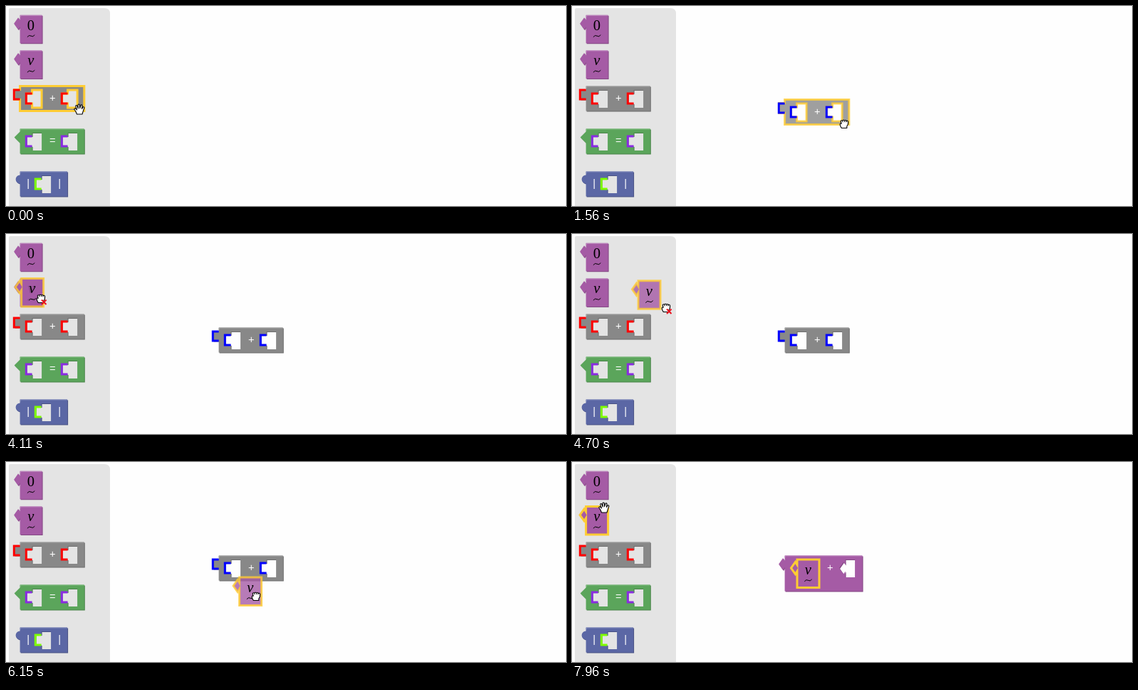
An HTML page for the animation above (8000 ms loop, 786 by 281 pixels).

```html
<!DOCTYPE html>
<html lang="en">
<head>
<meta charset="utf-8">
<title>Vector blocks</title>
<style>
  html, body { margin: 0; width: 100%; height: 100%; overflow: hidden; background: #fefefe; }
  svg { display: block; width: 786px; height: 281px; }
  .face, .dark { fill-rule: evenodd; }
  .light { fill: none; stroke-width: 1; }
  .bracket { fill: none; stroke-width: 3; }
  .sign { font: 14.67px "Liberation Sans", Arial, sans-serif; fill: #fff; text-anchor: middle; }
  .math { font: 20.5px "Liberation Serif", "Times New Roman", serif; text-anchor: middle; }
  .italic { font-style: italic; }
  .tilde { fill: none; stroke: #000; stroke-width: 1; }
  .sel > .face { stroke: #fc3; stroke-width: 3; }
  .sel > .light, .drag > .light, .drag > .dark { display: none; }
  .drag > .face { fill-opacity: .8; stroke-opacity: .8; }
  #cursor path { fill: #fff; stroke: #000; stroke-width: 1.1; stroke-linejoin: round; }
  #cursor .crease { fill: none; }
  #cursor #cross { fill: none; stroke: #e8101c; stroke-width: 2; }
</style>
</head>
<body>
<svg viewBox="0 0 786 281" xmlns="http://www.w3.org/2000/svg">
  <path d="M4 281V5q0-2 2-2H138q8 0 8 8V281Z" fill="#e4e4e4"/>
  <g id="blocks"></g>
  <g id="cursor">
    <g id="open" transform="translate(-8 -8)">
      <path d="M4.5 15L2.7 10.8.8 8.2Q1 6.3 2.9 7.2L4.5 9 2.7 3.6Q3.2 1.8 4.7 3L6.3 7 6 1.8Q7 .2 8.3 1.6L8.7 6.6 10 2.2Q11.3 1.2 12 2.8L11.5 7.4 13.2 4.8Q14.9 4.3 14.8 6L13.3 10.6 12 15Z"/>
    </g>
    <g id="closed" transform="translate(-8 -8)">
      <path d="M4.3 14.5L2.6 11.4 2.2 9Q2.7 7.5 4.2 8.3L3.2 4.8Q4 3 5.7 4.2 7 2.6 8.5 3.9 10 2.9 11.2 4.4 13.3 3.8 13.6 5.8L13.4 9.2 11.8 12V14.5Z"/>
      <path class="crease" d="M6 4.4V6.2M8.6 4.2V6M11 4.6V6.3"/>
    </g>
    <g id="arrow">
      <path d="M.5 .5V16.3L4.1 13 6.7 18.6 9 17.6 6.5 12H11.2Z"/>
    </g>
    <path id="cross" d="M1 2.5l6.5 6.5m0-6.5l-6.5 6.5"/>
  </g>
</svg>
<script>
const $ = id => document.getElementById(id);

// Connector outlines, drawn upwards along a left edge around height c
const tabs = {
  arrow: c => `V${c + 4.5}l-2.5 4l-6-8.5l6-8.5l2.5 4`,
  wedge: c => `V${c + 8}l-8-8l8-8`,
  round: c => `V${c + 6}a6 6 0 0 1 0-12`,
  square: c => `V${c + 7}h-8v-14h8`
};

// Face, lit edge, shaded edge
const palette = {
  purple: ['#a55ba5', '#c08cc0', '#844984'],
  grey: ['#888888', '#acacac', '#6d6d6d'],
  green: ['#5ba55b', '#8cc08c', '#498449'],
  blue: ['#5b67a5', '#8c95c0', '#495284']
};

const bracket = (x, c, r, color) =>
  `<path class="bracket" stroke="${color}" d="M${x} ${c - r}h-8.3v${2 * r}h8.3"/>`;

const sign = (x, text) => `<text class="sign" x="${x + 0.6}" y="21.6">${text}</text>`;

const math = (text, style = '') =>
  `<text class="math ${style}" x="15.3" y="21">${text}</text>
   <path class="tilde" d="M10.3 30.8q2.500-3.500 5.200-1.500t5.200-1.500"/>`;

function block(id, x, y, o) {
  const [fill, light, dark] = palette[o.color];
  const holes = (o.slots || [])
    .map(s => `M${s} 5.5h13.500v25H${s}${tabs[o.slotTab || 'square'](17.5)}Z`).join('');
  const d = `M0 0H${o.w}V${o.h}H0${tabs[o.tab](o.c || 12)}Z${holes}`;
  const marks = o.mark ? o.slots.map(s => bracket(s, 17.5, 7, o.mark)).join('') : '';
  const tabMark = o.tab === 'square' ? bracket(0, 12, 6.5, o.mark) : '';
  return `<g id="${id}" transform="translate(${x} ${y})">
    <path class="dark" d="${d}" fill="${dark}" transform="translate(1 1)"/>
    <path class="face" d="${d}" fill="${fill}"/>
    <path class="light" d="M.5 3V.5H${o.w - 0.5}" stroke="${light}"/>
    ${marks}${tabMark}${o.label}</g>`;
}

const vector = { color: 'purple', w: 31, h: 39.5, tab: 'arrow' };
const pair = { w: 90.2, h: 35.2, slots: [17, 67] };
const zero = { ...vector, label: math('0') };
const vee = { ...vector, label: math('v', 'italic') };
const sum = mark => ({ ...pair, color: 'grey', tab: 'square', mark, label: sign(45, '+') });
const equals = { ...pair, color: 'green', tab: 'wedge', mark: '#8a2be2', label: sign(45, '=') };
const norm = { color: 'blue', w: 66.5, h: 35.2, tab: 'round', c: 11, slots: [30], mark: '#7fff00',
  label: sign(11, '|') + sign(55, '|') };
const joined = { color: 'purple', w: 109, h: 50.2, tab: 'arrow', slots: [85], slotTab: 'arrow',
  label: sign(63, '+') };

const left = 19.6;
const home = { x: 298.6, y: 131.4 };

$('blocks').innerHTML =
  block('zero', left, 12.8, zero) +
  block('menuVee', left, 62.4, vee) +
  block('menuSum', left, 112.4, sum('#f00')) +
  block('equals', left, 172.4, equals) +
  block('norm', left, 232.4, norm) +
  block('sum', home.x, home.y, sum('#00f')) +
  block('joined', home.x, home.y, joined) +
  block('vee', 316, 137, vee);

const linear = p => p;
const easeIn = p => p * p;
const easeOut = p => p * (2 - p);
const smooth = p => p * p * (3 - 2 * p);
const smoother = p => p * p * p * (p * (6 * p - 15) + 10);

// A move advances in held steps; keys are [step, x, y, easing towards here]
const sumMove = { start: 458, step: 122.4, keys: [[0, left, 112.4], [9, home.x, home.y, smooth]] };
const veeMove = {
  start: 3990, step: 118,
  keys: [[0, left, 62.4], [6, 93, 65.8, easeIn], [11, 202.6, 139, linear],
    [14, 292, 180, linear], [18, 327.6, 162, easeOut], [22, 317, 139, easeIn]]
};

// Pointer moves in order; a drag carries the pointer ahead of its block
const pointer = [
  { start: 0, step: 0, keys: [[0, 103, 145]] },
  { ...sumMove, drag: [83.4, 33.6] },
  { start: 2528, step: 122, keys: [[0, 382, 165], [7, 61, 89, smoother]] },
  { start: 3390, step: 118, keys: [[0, 61, 89], [3, 44, 90, linear]] },
  { ...veeMove, drag: [24, 27] },
  { start: 6880, step: 118, keys: [[0, 341, 166], [3, 346, 184, easeIn]] },
  { start: 7360, step: 120, keys: [[0, 346, 184], [5, 45, 64, smooth]] }
];

function spot(keys, s) {
  const i = keys.findIndex(k => k[0] > s);
  if (i < 0) return keys.at(-1).slice(1, 3);
  const [s0, x0, y0] = keys[Math.max(0, i - 1)];
  const [s1, x1, y1, ease] = keys[i];
  const p = ease((s - s0) / (s1 - s0));
  return [x0 + (x1 - x0) * p, y0 + (y1 - y0) * p];
}

const stepAt = (move, t) => move.step ? Math.max(0, Math.floor((t - move.start) / move.step)) : 0;

const place = (id, [x, y]) => $(id).setAttribute('transform', `translate(${x} ${y})`);
const show = (id, on) => { $(id).style.display = on ? '' : 'none'; };
const flag = (id, sel, drag) =>
  $(id).setAttribute('class', (sel ? 'sel ' : '') + (drag ? 'drag' : ''));
const within = (t, a, b) => t >= a && t < b;

function drawPointer(t, dragging) {
  const move = pointer.findLast(m => t >= m.start + m.step);
  const [dx, dy] = move.drag || [0, 0];
  const [x, y] = spot(move.keys, stepAt(move, t) + (move.drag ? 0.7 : 0));
  const at = [Math.round(x + dx), Math.round(y + dy)];
  const kind = within(t, 100, 2410) || within(t, 3990, 7120) ? 'closed'
    : within(t, 2650, 3510) || within(t, 7480, 7960) ? 'arrow' : 'open';
  place('cursor', at);
  for (const k of ['open', 'closed', 'arrow']) show(k, k === kind);
  show('cross', dragging && at[0] < 146);
}

function draw(t) {
  const dragSum = within(t, 580, 1930);
  const dragVee = within(t, 4110, 7000);

  flag('menuSum', t < 580);
  flag('menuVee', within(t, 3510, 4110) || t >= 7960);
  flag('sum', t < 4110, dragSum);
  flag('vee', true, dragVee);
  show('sum', within(t, 580, 7000));
  show('joined', t >= 7000);
  show('vee', t >= 4110);

  place('sum', spot(sumMove.keys, stepAt(sumMove, t)));
  place('vee', dragVee ? spot(veeMove.keys, stepAt(veeMove, t)) : [316, 137]);
  drawPointer(t, dragSum || dragVee);
}

function tick(now) {
  draw(now % 8000);
  requestAnimationFrame(tick);
}
draw(0);
requestAnimationFrame(tick);
</script>
</body>
</html>
```
